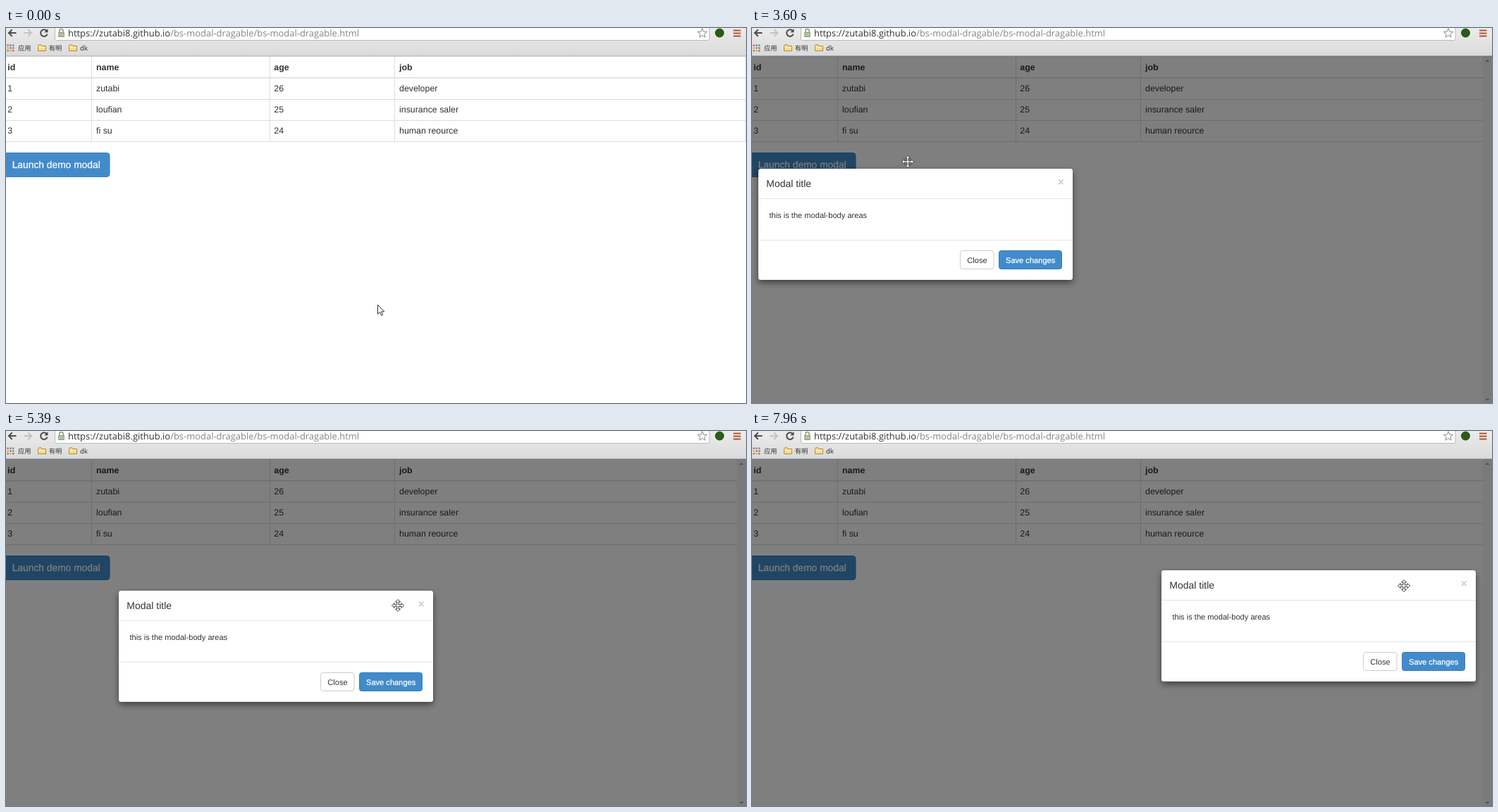
An HTML page that plays this animation: 1050x533 px, repeating every 8 s.

```html
<!DOCTYPE html>
<html lang="en">
<head>
<meta charset="utf-8">
<title>Draggable modal</title>
<style>
  html, body { margin: 0; width: 100%; height: 100%; overflow: hidden; background: #fff; }
  svg { display: block; width: 100%; height: 100%; }
  text { font-family: "Liberation Sans", Arial, sans-serif; fill: #333; text-rendering: geometricPrecision; white-space: pre; }
  .cell { font-size: 12.4px; }
  .head { font-weight: bold; }
  .small { font-size: 11.1px; }
  .light { fill: #fff; stroke: #fff; stroke-width: .25px; }
  .url { font: 12.95px "Open Sans", "Noto Sans", sans-serif; }
  .mark { font: 9.3px "Noto Sans CJK SC", "Noto Sans CJK", "Noto Sans", sans-serif; }
  .cursor { fill: #fff; stroke: #333; stroke-linejoin: round; }
</style>
</head>
<body>
<svg viewBox="0 0 1050 533" preserveAspectRatio="none">
  <defs>
    <linearGradient id="bar" x2="0" y2="1">
      <stop offset="0" stop-color="#ececec"/><stop offset="1" stop-color="#dadada"/>
    </linearGradient>
    <filter id="shadow" x="-10%" y="-20%" width="120%" height="150%">
      <feDropShadow dx="0" dy="4" stdDeviation="5" flood-color="#000" flood-opacity=".5"/>
    </filter>
    <g id="folder">
      <path d="M.5 2.5V9.5H11.5V2.5H6L5 .8H1.5Z" fill="#f5dc91" stroke="#b58a35" stroke-linejoin="round"/>
      <path d="M1 4.5H11" stroke="#fff3c8"/>
    </g>
  </defs>

  <rect width="1050" height="533" fill="#fff"/>
  <g id="table">
    <path d="M0 101.5H1050M0 131.5H1050M0 161.5H1050M121.5 40V162M374.5 40V162M551.5 40V162M1049.5 40V162" stroke="#ddd" fill="none"/>
    <path d="M0 70.7H1050" stroke="#ddd" stroke-width="1.6"/>
  </g>
  <rect id="launch" x="-6" y="177.5" width="153" height="34" rx="4"/>
  <text class="light" x="8.7" y="199" font-size="13.8">Launch demo modal</text>

  <path id="backdrop" fill-rule="evenodd"/>
  <g id="scroll">
    <rect id="track" x="1037" y="40" width="13" height="493"/>
    <path id="arrows" d="M1040.5 48L1043.5 45L1046.5 48ZM1040.5 527L1043.5 530L1046.5 527Z" fill="#505050"/>
  </g>

  <g id="modal">
    <rect width="446" height="158" rx="4" fill="#fff" filter="url(#shadow)"/>
    <path d="M0 42.5H446M0 101.5H446" stroke="#e5e5e5"/>
    <text x="11.3" y="25.5" font-size="14">Modal title</text>
    <text x="424.8" y="24" font-size="15.6" font-weight="bold" style="fill:#ccc">×</text>
    <text class="small" x="15.4" y="70.3">this is the modal-body areas</text>
    <rect x="286.5" y="116.5" width="47.5" height="26" rx="3" fill="#fff" stroke="#ccc"/>
    <text class="small" x="296.3" y="133.8">Close</text>
    <rect x="341.5" y="116.5" width="89" height="26" rx="3" fill="#428bca" stroke="#357ebd"/>
    <text class="small light" x="351" y="133.8">Save changes</text>
  </g>

  <g id="chrome">
    <rect width="1050" height="40" fill="url(#bar)"/>
    <rect x="69.5" y="-10" width="928.5" height="27.5" rx="2" fill="#fff" stroke="#b9b9b9"/>
    <g fill="none" stroke="#4c4c4c" stroke-width="2">
      <path d="M14.5 7H4M8.7 2.2L3.9 7L8.7 11.8"/>
      <path d="M25.5 7H36M31.3 2.2L36.1 7L31.3 11.8" stroke="#c3c3c3"/>
      <path d="M57.5 3.8A4.8 4.8 0 1 0 58.6 8.5"/>
      <path d="M59.5 1V6.2H54.3Z" fill="#4c4c4c" stroke="none"/>
    </g>
    <path d="M75.8 6V4.2A2.7 2.7 0 0 1 81.2 4.2V6" fill="none" stroke="#8a9a78" stroke-width="1.5"/>
    <rect x="74" y="5.8" width="9" height="7.2" rx="1" fill="#9aab86"/>
    <path d="M75 8.5H82M75 10.5H82" stroke="#c9d4bd"/>
    <text class="url" x="88" y="12">https://zutabi8.github.io<tspan fill="#858585">/bs-modal-dragable/bs-modal-dragable.html</tspan></text>
    <path id="star" fill="#fff" stroke="#8a8a8a" stroke-linejoin="round"/>
    <circle cx="1012.5" cy="7" r="6.5" fill="#2c5a17"/>
    <path d="M1032 3.5H1042.5M1032 7.5H1042.5M1032 11.5H1042.5" stroke="#b4532f" stroke-width="2"/>
    <g id="apps"></g>
    <text class="mark" x="17" y="32.3">应用</text>
    <use href="#folder" x="45" y="23"/>
    <text class="mark" x="60.7" y="32.3">有明</text>
    <use href="#folder" x="89" y="23"/>
    <text class="mark" x="105" y="32.3">dk</text>
    <path id="edge" d="M0 40H1050" stroke-width="1.2"/>
  </g>

  <path id="arrow" class="cursor" d="M0 0V13L3 10.2L5.2 15L7.2 14.1L5 9.5H9.2Z"/>
  <path id="mover" class="cursor" d="M0 -8.5L3.5 -5H1.2V-1.2H5V-3.5L8.5 0L5 3.5V1.2H1.2V5H3.5L0 8.5L-3.5 5H-1.2V1.2H-5V3.5L-8.5 0L-5 -3.5V-1.2H-1.2V-5H-3.5Z"/>
</svg>
<script>
const $ = id => document.getElementById(id);
const LOOP = 8000, STEP = 78.125, W = 446, H = 158;
const OPEN = 17, GRAB = 36, RELEASE = 75, REGRAB = 80;

function add(parent, tag, attrs, text) {
  const el = document.createElementNS('http://www.w3.org/2000/svg', tag);
  for (const k in attrs) el.setAttribute(k, attrs[k]);
  if (text) el.textContent = text;
  parent.appendChild(el);
}
const set = (id, attrs) => { for (const k in attrs) $(id).setAttribute(k, attrs[k]); };
const show = (id, on) => { $(id).style.display = on ? '' : 'none'; };
const clamp = (v, lo, hi) => Math.max(lo, Math.min(hi, v));

const rows = [
  ['id', 'name', 'age', 'job'],
  ['1', 'zutabi', '26', 'developer'],
  ['2', 'loufian', '25', 'insurance saler'],
  ['3', 'fi su', '24', 'human reource']
];
const columns = [2.3, 128, 380.3, 558];
rows.forEach((row, r) => row.forEach((word, c) => add($('table'), 'text', {
  x: columns[c], y: 59.5 + 30.3 * r, class: r ? 'cell' : 'cell head'
}, word)));

const dotColors = ['#d9543f', '#e0a33a', '#5b9a4c', '#4f7fc4'];
for (let i = 0; i < 9; i++) add($('apps'), 'rect', {
  x: 1.5 + i % 3 * 3.8, y: 23.5 + Math.floor(i / 3) * 3.8, width: 2.3, height: 2.3, fill: dotColors[i * 3 % 4]
});

let star = '';
for (let i = 0; i < 10; i++) {
  const a = i * Math.PI / 5, r = i % 2 ? 3 : 7;
  star += (i ? 'L' : 'M') + (988 + r * Math.sin(a)).toFixed(2) + ' ' + (7.5 - r * Math.cos(a)).toFixed(2);
}
set('star', { d: star + 'Z' });

// Turning points of the pointer: step, x, y
const turns = [
  [0, 527.5, 393.5], [9, 127.5, 207.5], [18, 127.5, 207.5], [24, 603, 178], [35, 505, 86],
  [37, 486, 75], [40, 340, 54], [46, 221, 190], [49, 470, 54], [51, 740, 379], [53, 918, 320],
  [55, 977, 386], [57, 950, 271], [67, 435, 225], [69, 556, 248], [RELEASE, 977, 126],
  [79, 811, 120], [82, 811, 120], [84, 719, 79], [86, 687, 76], [90, 239, 172],
  [96, 500, 387], [99, 860, 86], [102, 925, 220]
];

function pointer(n) {
  const i = Math.max(1, turns.findIndex(p => p[0] >= n));
  const [n0, x0, y0] = turns[i - 1], [n1, x1, y1] = turns[i];
  const k = (n - n0) / (n1 - n0);
  return { x: x0 + (x1 - x0) * k, y: y0 + (y1 - y0) * k };
}

// The modal follows each pointer move and stops at the page edges
const modalAt = [];
for (let n = 0, x = 293, y = 64; n * STEP < LOOP; n++) {
  if (n >= GRAB && (n <= RELEASE || n >= REGRAB)) {
    const a = pointer(n - 1), b = pointer(n);
    x = clamp(x + b.x - a.x, 9, 581);
    y = clamp(y + b.y - a.y, 64, 365);
  }
  const slide = 1 - clamp((n - OPEN) / 4, 0, 1);
  modalAt.push({ x: Math.round(x), y: Math.round(y - 37 * slide * slide) });
}

function draw(t) {
  const n = Math.floor((t + 12) / STEP);
  const open = n >= OPEN;
  const fade = clamp(0.33 + (n - OPEN) * 0.52, 0, 1);
  const p = pointer(n), m = modalAt[n];

  const hot = n < 19 && p.x < 147 && p.y > 177 && p.y < 212;
  const focus = hot && n >= 15;
  set('launch', {
    fill: hot ? '#3071a9' : '#428bca',
    stroke: focus ? '#8fa9d8' : hot ? '#285e8e' : '#357ebd'
  });

  for (const id of ['backdrop', 'scroll', 'modal']) show(id, open);
  set('backdrop', {
    d: `M0 40H1037V533H0ZM${m.x + 4} ${m.y}h${W - 8}q4 0 4 4v${H - 8}q0 4 -4 4h${8 - W}q-4 0 -4 -4v${8 - H}q0 -4 4 -4Z`,
    'fill-opacity': fade * 0.5
  });
  set('track', { fill: fade < 0.5 ? '#f9f9f9' : '#7a7a7a' });
  set('arrows', { opacity: fade < 0.5 ? 0.3 : 1 });
  set('modal', { transform: `translate(${m.x} ${m.y})`, opacity: fade });
  set('edge', { stroke: fade === 1 ? '#66758c' : '#a9a9a9' });

  const moving = n >= GRAB || (n > 24 && p.y < 106);
  show('arrow', !moving);
  show('mover', moving);
  set(moving ? 'mover' : 'arrow', { transform: `translate(${p.x} ${p.y})` });
}

const start = performance.now();
function tick() {
  draw((performance.now() - start) % LOOP);
  requestAnimationFrame(tick);
}
tick();
</script>
</body>
</html>
```
